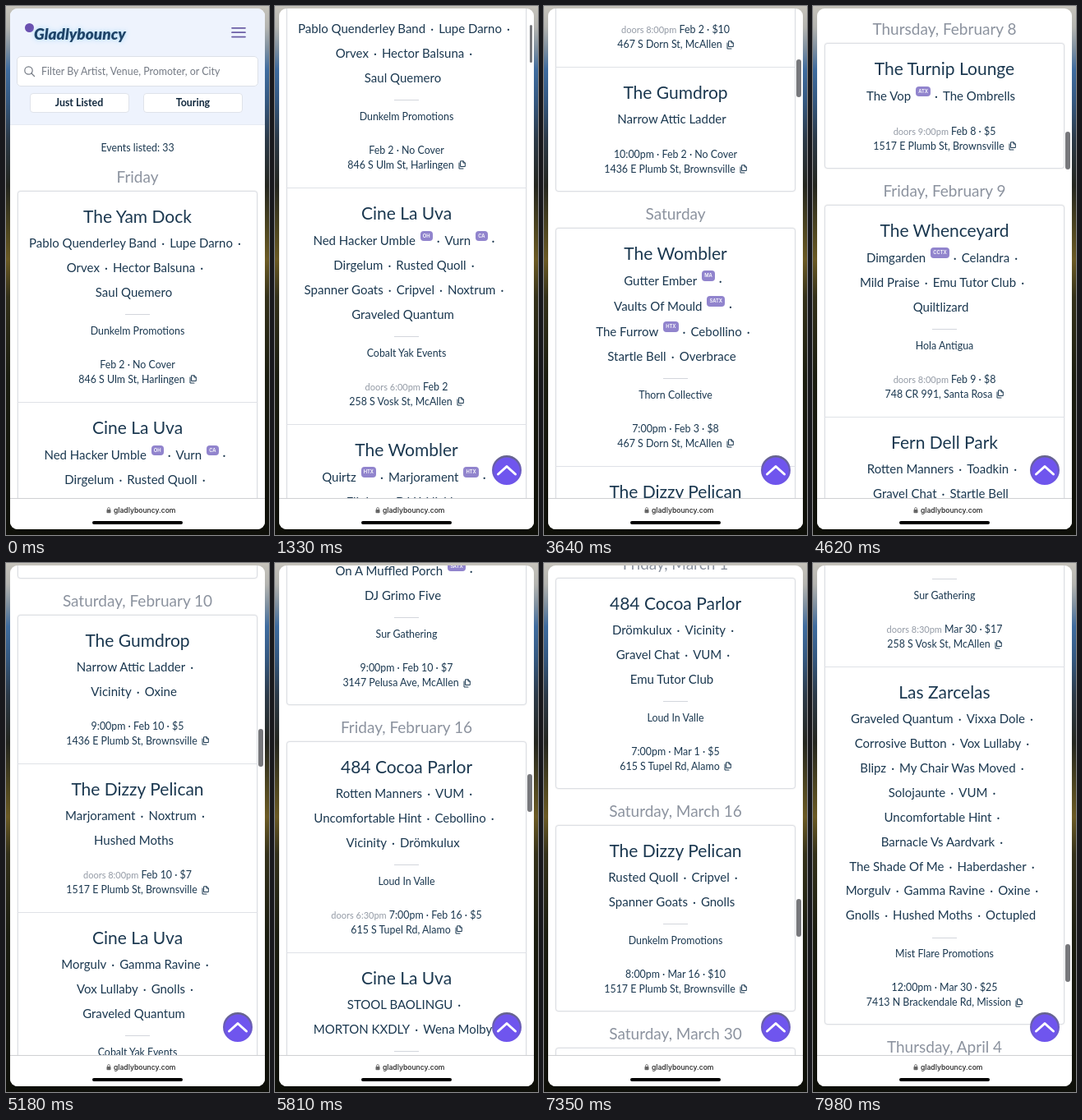
Animation, 320 px wide and 644 px high, one loop 8000 ms. Source, as an HTML page:

```html
<!DOCTYPE html>
<html lang="en">
<head>
<meta charset="utf-8">
<title>Event listings</title>
<style>
html, body { margin: 0; width: 100%; height: 100%; overflow: hidden; }
body {
  position: relative;
  font: 12.4px/18px Lato, sans-serif;
  color: #1b3850;
  background: linear-gradient(#c6c3bb, #b4b4b0 4%, #7f90a0 8%, #3f6c9f 12%, #345880 18%, #2c3a48 25%, #24261f 34%, #4d4520 42%, #6b5a24 48%, #34311a 55%, #1b1d10 70%, #0e0f09);
}
svg { fill: none; stroke-linecap: round; stroke-linejoin: round; }
#screen { position: absolute; left: 5px; top: 3px; width: 310px; height: 634px; overflow: hidden; border-radius: 9px; background: #fff; }
#page { position: absolute; left: -5px; top: -3px; width: 320px; text-align: center; white-space: nowrap; }

#hero { position: relative; height: 181px; }
#hero > * { position: absolute; box-sizing: border-box; }
#band { left: 0; top: 0; width: 320px; height: 145px; background: #eef3fd; border-bottom: 1px solid #e6eaf3; }
#dot { left: 23px; top: 21px; width: 11px; height: 11px; border-radius: 50%; background: #6a50b0; }
#brand { left: 34px; top: 21px; font: italic 900 19px/26px Lato, sans-serif; color: #1f4468; text-shadow: 0 0 6px #a9d8f8, 0 0 3px #d5ecfc; }
#menu { left: 273px; top: 25px; }
#search { left: 13px; top: 60.5px; width: 294px; height: 37.5px; padding-left: 29px; border: 1px solid #dde1e8; border-radius: 5px; background: #fff; line-height: 36px; text-align: left; color: #757b85; }
#search svg { position: absolute; left: 7px; top: 10px; }
.tab { top: 105.5px; width: 121px; height: 24px; border: 1px solid #dfe3ea; border-radius: 4px; background: #fff; font-weight: 700; line-height: 22px; color: #12293e; }
#count { left: 0; top: 164px; width: 320px; }

h2 { margin: 0; height: 44px; padding-top: 17px; box-sizing: border-box; font: 19px/20px Lato, sans-serif; color: #8c939f; }
.card { width: 292px; margin: 0 14px; border-radius: 4px; box-shadow: inset 0 0 0 1px #dcdfe4, 0 0 2px #0002; }
.event { padding: 16px 0 18px; }
.event + .event { box-shadow: inset 0 1px #dfe2e7; }
h3 { margin: 0 0 3px; font: 21px/30px Lato, sans-serif; }
.row { height: 29.9px; font-size: 15px; line-height: 29.9px; }
.row.tagged { padding-top: 1.2px; }
.row i { display: inline-block; width: 16px; font-style: normal; }
.row b { display: inline-block; position: relative; top: -7.5px; height: 12.5px; margin-left: 6px; margin-right: -1px; padding: 0 3px; vertical-align: middle; border-radius: 4px; background: #9184cd; color: #fff; font: 600 5.8px/12.5px Inter, sans-serif; }
.last { padding-right: 9px; }
hr { width: 30px; height: 1px; margin: 11.5px auto 10.7px; border: 0; background: #d3d6dc; }
.when { margin-top: 18.5px; }
.promoter + .when { margin-top: 23px; }
.when small { font-size: 11px; color: #949ba6; }
.where svg { margin-left: 5px; vertical-align: -1.5px; }

#top { position: absolute; left: 259px; top: 544px; }
#thumb { position: absolute; right: 2px; height: 46px; border-radius: 3px; background: #77787c; }
#bar { position: absolute; left: 0; bottom: 0; width: 310px; height: 38px; border-top: 1px solid #cfd0d3; box-sizing: border-box; background: #fff; }
#bar span { position: absolute; left: 126px; top: 5px; font: 500 8.6px/18px Inter, sans-serif; color: #222; }
#bar svg { position: absolute; left: 117px; top: 10px; }
#home { position: absolute; left: 100px; top: 26.5px; width: 110px; height: 4px; border-radius: 2px; background: #000; }
</style>
</head>
<body>
<div id="screen">
  <div id="page">
    <div id="hero">
      <div id="band"></div>
      <div id="dot"></div>
      <div id="brand">Gladlybouncy</div>
      <svg id="menu" width="20" height="15" stroke="#6c5fa6" stroke-width="1.7"><path d="M2 1.8H18M2 7.2H18M2 12.6H18"/></svg>
      <div id="search"><svg width="16" height="16" stroke="#757b85" stroke-width="1.2"><circle cx="6.5" cy="6.5" r="4.7"/><path d="M10 10L13.5 13.5"/></svg>Filter By Artist, Venue, Promoter, or City</div>
      <div class="tab" style="left:28.5px">Just Listed</div>
      <div class="tab" style="left:167px">Touring</div>
      <div id="count">Events listed: 33</div>
    </div>
  </div>
  <svg id="top" width="36" height="36">
    <linearGradient id="ring" x2="0" y2="1"><stop stop-color="#66648c"/><stop offset="1" stop-color="#6f55ee"/></linearGradient>
    <circle cx="18" cy="18" r="16.8" fill="#6f55ee" stroke="url(#ring)" stroke-width="2.4"/>
    <path d="M7.5 23L18 13.5L28.5 23" stroke="#fff" stroke-width="3"/>
  </svg>
  <div id="thumb"></div>
  <div id="bar">
    <svg width="6" height="8"><rect x=".5" y="3" width="5" height="4.2" rx=".8" fill="#666"/><path d="M1.6 3V2A1.4 1.4 0 0 1 4.4 2V3" stroke="#666" stroke-width=".8"/></svg>
    <span>gladlybouncy.com</span>
    <div id="home"></div>
  </div>
</div>
<script>
// Event: venue; artists (| new row, + same row, ^ origin tag); promoter; when; where
const listing = `
# Friday
The Yam Dock; Pablo Quenderley Band+Lupe Darno|Orvex+Hector Balsuna|Saul Quemero; Dunkelm Promotions; Feb 2 · No Cover; 846 S Ulm St, Harlingen
Cine La Uva; Ned Hacker Umble^OH+Vurn^CA|Dirgelum+Rusted Quoll|Spanner Goats+Cripvel+Noxtrum|Graveled Quantum; Cobalt Yak Events; doors 6:00pm Feb 2; 258 S Vosk St, McAllen
The Wombler; Quirtz^HTX+Marjorament^HTX|Flinker+DJ K-Nickle;; doors 8:00pm Feb 2 · $10; 467 S Dorn St, McAllen
The Gumdrop; Narrow Attic Ladder;; 10:00pm · Feb 2 · No Cover; 1436 E Plumb St, Brownsville
# Saturday
The Wombler; Gutter Ember^MA|Vaults Of Mould^SATX|The Furrow^HTX+Cebollino|Startle Bell+Overbrace; Thorn Collective; 7:00pm · Feb 3 · $8; 467 S Dorn St, McAllen
The Dizzy Pelican; Flinker+Mild Praise|Toadkin+Celandra; Cobalt Yak Events; 8:00pm · Feb 3 · $5; 1517 E Plumb St, Brownsville
The Gumdrop; Spanner Goats+Cripvel|Rotten Manners;; doors 9:00pm Feb 3 · $5; 1436 E Plumb St, Brownsville
# Sunday
Cine La Uva; Lupe Darno+Orvex|Corrosive Button|Gnolls+Blipz; Dunkelm Promotions; 7:00pm · Feb 4 · $10; 258 S Vosk St, McAllen
# Thursday, February 8
The Turnip Lounge; The Vop^ATX+The Ombrells;; doors 9:00pm Feb 8 · $5; 1517 E Plumb St, Brownsville
# Friday, February 9
The Whenceyard; Dimgarden^CCTX+Celandra|Mild Praise+Emu Tutor Club|Quiltlizard; Hola Antigua; doors 8:00pm Feb 9 · $8; 748 CR 991, Santa Rosa
Fern Dell Park; Rotten Manners+Toadkin|Gravel Chat+Startle Bell; Thorn Collective; 6:00pm · Feb 9 · No Cover; 329 Olmet Rd, Mission
# Saturday, February 10
The Gumdrop; Narrow Attic Ladder|Vicinity+Oxine;; 9:00pm · Feb 10 · $5; 1436 E Plumb St, Brownsville
The Dizzy Pelican; Marjorament+Noxtrum|Hushed Moths;; doors 8:00pm Feb 10 · $7; 1517 E Plumb St, Brownsville
Cine La Uva; Morgulv+Gamma Ravine|Vox Lullaby+Gnolls|Graveled Quantum; Cobalt Yak Events; 7:00pm · Feb 10 · $15; 258 S Vosk St, McAllen
The Yam Parlor; Vixxa Dole+Blipz|The Shade Of Me|On A Muffled Porch^SATX|DJ Grimo Five; Sur Gathering; 9:00pm · Feb 10 · $7; 3147 Pelusa Ave, McAllen
# Friday, February 16
484 Cocoa Parlor; Rotten Manners+VUM|Uncomfortable Hint+Cebollino|Vicinity+Drömkulux; Loud In Valle; doors 6:30pm 7:00pm · Feb 16 · $5; 615 S Tupel Rd, Alamo
Cine La Uva; STOOL BAOLINGU|MORTON KXDLY+Wena Molby; Cobalt Yak Events; 8:00pm · Feb 16 · $10; 258 S Vosk St, McAllen
The Gumdrop; Solojaunte+Haberdasher|Mild Praise;; 9:00pm · Feb 16 · $5; 1436 E Plumb St, Brownsville
# Saturday, February 17
The Wombler; Vaults Of Mould^SATX+Orvex|Overbrace+Startle Bell|Corrosive Button|Dirgelum+Noxtrum; Thorn Collective; 7:00pm · Feb 17 · $8; 467 S Dorn St, McAllen
The Whenceyard; Dimgarden^CCTX+Flinker|The Vop^ATX+Celandra; Hola Antigua; doors 8:00pm Feb 17 · $8; 748 CR 991, Santa Rosa
# Friday, February 23
The Wombler; Pond Rhythm^SATX+Fib^HTX+Quietud|Affections+Toadkin+Oxine; Thorn Collective; 7:00pm · Feb 23 · $8; 467 S Dorn St, McAllen
# Saturday, February 24
Cine La Uva; Ramiro, Ya Vas Cansando^MX; Badger's Milk; 7:00pm · Feb 24 · $25; 258 S Vosk St, McAllen
# Monday, February 26
The Gumdrop; The Furrow+Gutter Ember|Hushed Moths;; 8:00pm · Feb 26 · $10; 1436 E Plumb St, Brownsville
# Friday, March 1
484 Cocoa Parlor; Drömkulux+Vicinity|Gravel Chat+VUM|Emu Tutor Club; Loud In Valle; 7:00pm · Mar 1 · $5; 615 S Tupel Rd, Alamo
# Saturday, March 16
The Dizzy Pelican; Rusted Quoll+Cripvel|Spanner Goats+Gnolls; Dunkelm Promotions; 8:00pm · Mar 16 · $10; 1517 E Plumb St, Brownsville
# Saturday, March 30
Cine La Uva; On A Muffled Porch^SATX|Morgulv+The Shade Of Me|Quirtz^HTX+Quietud|Fib^HTX+Celandra|DJ Grimo Five; Sur Gathering; doors 8:30pm Mar 30 · $17; 258 S Vosk St, McAllen
Las Zarcelas; Graveled Quantum+Vixxa Dole|Corrosive Button+Vox Lullaby|Blipz+My Chair Was Moved|Solojaunte+VUM|Uncomfortable Hint|Barnacle Vs Aardvark|The Shade Of Me+Haberdasher|Morgulv+Gamma Ravine+Oxine|Gnolls+Hushed Moths+Octupled; Mist Flare Promotions; 12:00pm · Mar 30 · $25; 7413 N Brackendale Rd, Mission
# Thursday, April 4
The Wombler; Pond Rhythm+Affections; Thorn Collective; 7:00pm · Apr 4 · $8; 467 S Dorn St, McAllen`;

const copyIcon = '<svg width="9" height="11" stroke="#1b3850" stroke-width="1"><path d="M3 .8H6L8.3 3V7.5H3ZM6 .8V3H8.3M1 3V10H6"/></svg>';

function artistRows(text) {
  const rows = text.split('|');
  return rows.map((row, i) => {
    const names = row.split('+').map(name => name.replace(/\^(\w+)/, '<b>$1</b>')).join('<i>·</i>');
    const isLast = i === rows.length - 1;
    const classes = `row${row.includes('^') ? ' tagged' : ''}${isLast ? ' last' : ''}`;
    return `<div class="${classes}">${names}${isLast ? '' : '<i>·</i>'}</div>`;
  }).join('');
}

function eventHtml(line) {
  const [venue, artists, promoter, when, where] = line.split(';').map(part => part.trim());
  return `<div class="event"><h3>${venue}</h3>${artistRows(artists)}` +
    (promoter && `<hr><div class="promoter">${promoter}</div>`) +
    `<div class="when">${when.replace(/^doors \S+/, '<small>$&</small>')}</div>` +
    `<div class="where">${where}${copyIcon}</div></div>`;
}

const find = id => document.getElementById(id);
const page = find('page'), thumb = find('thumb'), topButton = find('top');
const cards = {};

for (const section of listing.split('# ').slice(1)) {
  const [day, ...events] = section.trim().split('\n');
  page.insertAdjacentHTML('beforeend', `<h2>${day}</h2><div class="card">${events.map(eventHtml).join('')}</div>`);
  cards[day] = page.lastElementChild;
}

const LOOP = 8000, STEP = 70, FLICK = 800, REST = 3150, DRAG = 3400;
const flick = t => 413 * (1 - Math.exp((FLICK - t) / 530));

// Scrollbar drag: at each time a day's card sits at the given height on screen
const stops = [[DRAG, flick(REST)], ...[
  [3640, 'Saturday', 270],
  [4620, 'Thursday, February 8', 45],
  [5810, 'Friday, February 16', 217],
  [6720, 'Friday, February 23', 62],
  [7980, 'Thursday, April 4', 606],
].map(([time, day, y]) => [time, cards[day].offsetTop - y])];

function scrollAt(t) {
  if (t < FLICK) return 0;
  if (t < DRAG) return flick(Math.min(t, REST));
  const i = Math.max(1, stops.findIndex(([time]) => t <= time));
  const [t0, y0] = stops[i - 1], [t1, y1] = stops[i];
  return y0 + (y1 - y0) * (t - t0) / (t1 - t0);
}

function draw() {
  const t = Math.floor(performance.now() % LOOP / STEP) * STEP;
  const scroll = Math.round(scrollAt(t));
  page.style.transform = `translateY(${-scroll}px)`;
  topButton.style.visibility = scroll > 100 ? 'visible' : 'hidden';
  thumb.style.visibility = scroll > 0 ? 'visible' : 'hidden';
  thumb.style.width = t < DRAG ? '3px' : '6px';
  thumb.style.top = `${1.5 + scroll / 14.47}px`;
  requestAnimationFrame(draw);
}
draw();
</script>
</body>
</html>
```
